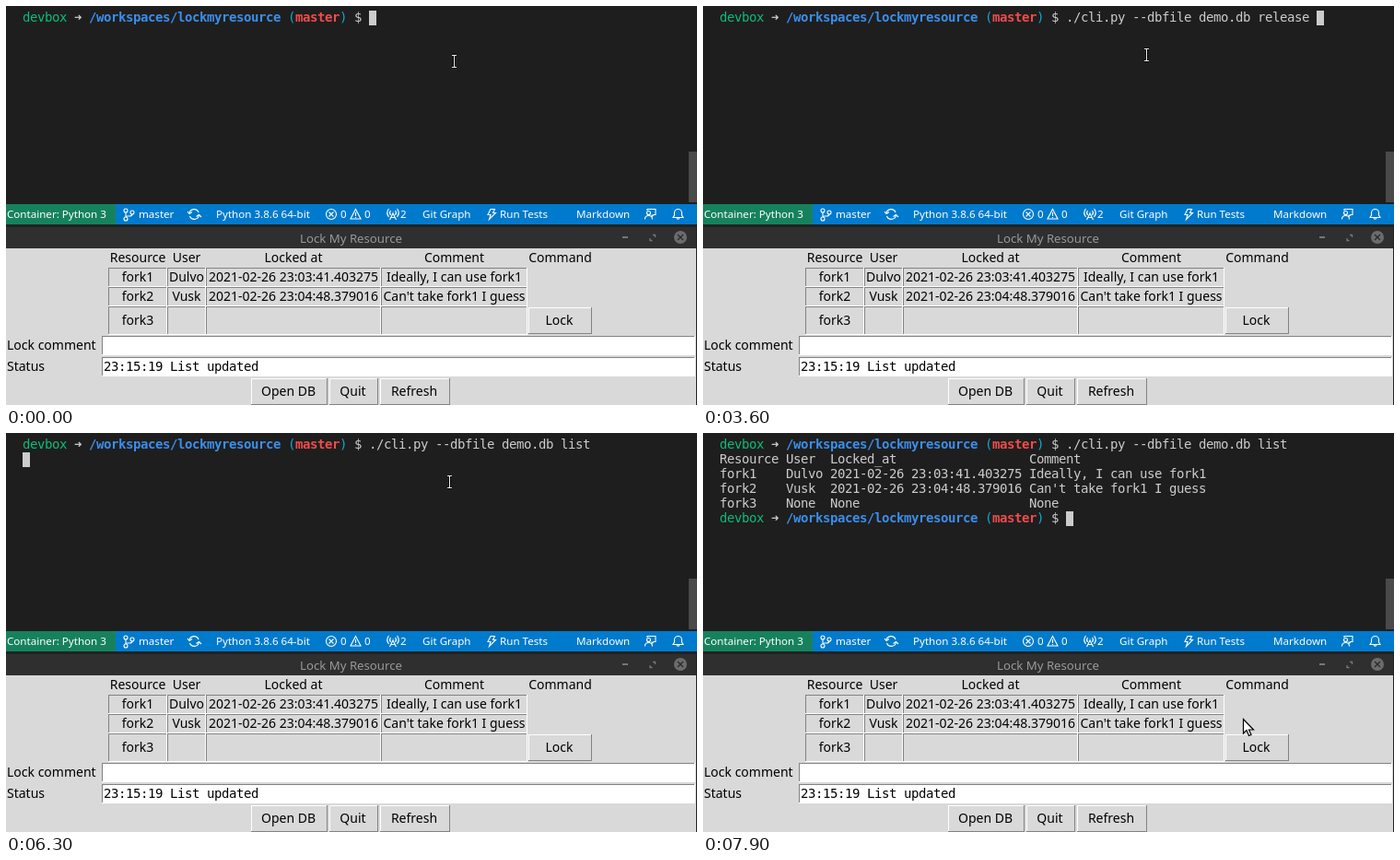
An HTML page with a canvas that plays this animation: 750 by 433 pixels, repeating every 8000 ms.

```html
<!DOCTYPE html>
<html lang="en">
<head>
<meta charset="utf-8">
<title>Lock My Resource</title>
<style>
html, body { margin: 0; width: 100%; height: 100%; overflow: hidden; background: #1e1e1e; }
canvas { display: block; }
</style>
</head>
<body>
<canvas id="stage" width="750" height="433"></canvas>
<script>
const ctx = document.getElementById('stage').getContext('2d', { alpha: false });
const LOOP = 8000, CELL = 8, ROW = 16;
const MONO = '14px "DejaVu Sans Mono", monospace';
const SANS = '14px "Noto Sans", sans-serif';
const SMALL = '11.6px "Noto Sans", sans-serif';
const COMMAND = './cli.py --dbfile demo.db ';
const USERS = ['Dulvo', 'Vusk'];
const TIMES = ['2021-02-26 23:03:41.403275', '2021-02-26 23:04:48.379016'];
const COMMENTS = ['Ideally, I can use fork1', "Can't take fork1 I guess"];

// Typed input from each moment on
const TYPING = [
  [0, ''], [2400, COMMAND + 'release fork3'], [3600, COMMAND + 'release '],
  [4100, COMMAND], [5800, COMMAND + 'l'], [6000, COMMAND + 'li'],
  [6100, COMMAND + 'lis'], [6200, COMMAND + 'list']
];
const ENTER = 6300, OUTPUT = 6500;

// Pointer stops: time, x, y
const POINTER = [
  [0, 486, 60], [200, 485, 58], [300, 483, 55], [400, 481, 53],
  [7600, 487, 72], [7700, 519, 160], [7800, 568, 268], [7900, 586, 310]
];

const latest = (list, t) => list.filter(item => item[0] <= t).pop();

function box(x, y, w, h, color) {
  ctx.fillStyle = color;
  ctx.fillRect(x, y, w, h);
}

function text(str, x, y, font = SANS, color = '#000', align = 'left') {
  ctx.font = font;
  ctx.fillStyle = color;
  ctx.textAlign = align;
  ctx.fillText(str, x, y);
}

const label = (str, x, y) => text(str, x, y, SANS, '#000', 'center');

function mono(str, x, y, color, bold) {
  [...str].forEach((ch, i) => text(ch, x + i * CELL, y, (bold ? 'bold ' : '') + MONO, color));
}

function bevel(x, y, w, h, topLeft, bottomRight, fill = '#d9d9d9') {
  box(x, y, w, h, bottomRight);
  box(x, y, w - 1, h - 1, topLeft);
  box(x + 1, y + 1, w - 2, h - 2, fill);
}

const sunken = (x, y, w, h, fill) => bevel(x, y, w, h, '#828282', '#fff', fill);

function button(str, x, y, w, h) {
  bevel(x, y, w, h, '#fff', '#828282');
  label(str, x + w / 2 - 1, y + 19);
}

function stroke(path, color = '#fff', width = 1.1) {
  ctx.strokeStyle = color;
  ctx.lineWidth = width;
  ctx.stroke(new Path2D(path));
}

// Terminal

const line = (str, row, col = 0, color = '#ccc', bold = false) =>
  mono(str, 18 + col * CELL, 17 + row * ROW, color, bold);

const caret = (row, col) => box(18 + col * CELL, 5 + row * ROW, CELL, ROW, '#ccc');

function prompt(row) {
  line('devbox', row, 0, '#0dbc79');
  line('➜', row, 7);
  line('/workspaces/lockmyresource', row, 9, '#3b8eea', true);
  line('(', row, 36, '#11a8cd');
  line('master', row, 37, '#f14c4c', true);
  line(')', row, 43, '#11a8cd');
  line('$', row, 45);
}

function listing() {
  const rows = [
    ['Resource', 'User', 'Locked_at', 'Comment'],
    ['fork1', USERS[0], TIMES[0], COMMENTS[0]],
    ['fork2', USERS[1], TIMES[1], COMMENTS[1]],
    ['fork3', 'None', 'None', 'None']
  ];
  rows.forEach((row, r) => row.forEach((cell, c) => line(cell, r + 1, [0, 9, 15, 42][c])));
}

function terminal(t) {
  box(0, 0, 750, 215, '#1e1e1e');
  box(741, 158, 9, 55, '#4a4a4a');
  const typed = latest(TYPING, t)[1];
  prompt(0);
  line(typed, 0, 47);
  if (t < ENTER) caret(0, 47 + typed.length);
  else if (t < OUTPUT) caret(1, 0);
  else {
    listing();
    prompt(5);
    caret(5, 47);
  }
}

function statusBar() {
  box(0, 215, 750, 22, '#007acc');
  box(0, 215, 119, 22, '#16825d');
  const items = [
    ['Container: Python 3', 1], ['master', 144], ['Python 3.8.6 64-bit', 228], ['0', 363],
    ['0', 389], ['2', 428], ['Git Graph', 452], ['Run Tests', 536], ['Markdown', 619]
  ];
  items.forEach(([str, x]) => text(str, x, 230, SMALL, '#fff'));
  // branch, sync
  stroke('M132 222a2 2 0 1 0-4 0a2 2 0 1 0 4 0M132 231a2 2 0 1 0-4 0a2 2 0 1 0 4 0' +
    'M139 224a2 2 0 1 0-4 0a2 2 0 1 0 4 0M130 224v5M137 226q0 2-3 2h-2q-2 0-2 1');
  stroke('M199 225a5.2 5.2 0 0 1 10-1M209.500 227a5.2 5.2 0 0 1-10 1M197 223l2 2.500 3-2M212 229l-2.500-2.500-3 2');
  // error, warning
  stroke('M358.500 226a5.500 5.500 0 1 0-11 0a5.500 5.500 0 1 0 11 0M350.500 223.500l5 5m0-5l-5 5');
  stroke('M379.500 220.500l5.500 10.500h-11zM379.500 224v4M379.500 229v1');
  // radio tower
  stroke('M420 225l-3.500 7M420 225l3.500 7M418 229.500h4M417.500 227q-2-2.500 0-5M422.500 227q2-2.500 0-5' +
    'M415.500 229q-3.500-4.500 0-9M424.500 229q3.500-4.500 0-9M419.500 224h1');
  // bolt, feedback, bell
  stroke('M526 220.500h4.500l-2 4h3l-7 7 1.500-5h-3z');
  stroke('M696 222v-1.500h9v6h-2l-2 2v-2M699.500 224.500a2 2 0 1 0-4 0a2 2 0 1 0 4 0M693.500 231.500q0-4 4-4t4 4');
  stroke('M724 229.500h11l-1.500-2.500v-2.500a4 4 0 0 0-8 0v2.500zM728 230q1.500 2.500 3 0');
}

// Window

function titleBar() {
  box(0, 237, 750, 26, '#222');
  box(0, 240, 749, 23, '#2f2f2f');
  text('Lock My Resource', 374.5, 257, '13.2px "Noto Sans", sans-serif', '#999', 'center');
  box(669, 250, 6, 2, '#777');
  stroke('M702 248.500h2.500v2.500M701.500 254.500h-2.500v-2.500', '#777', 1.3);
  ctx.fillStyle = '#6c6c6c';
  ctx.beginPath();
  ctx.arc(732, 251, 7, 0, 2 * Math.PI);
  ctx.fill();
  stroke('M729 248l6 6m0-6l-6 6', '#2a2a2a', 1.4);
}

function appWindow() {
  titleBar();
  box(0, 263, 750, 170, '#d9d9d9');
  const columns = [
    ['Resource', 111, 64, ['fork1', 'fork2', 'fork3']], ['User', 175, 42, USERS],
    ['Locked at', 217, 190, TIMES], ['Comment', 407, 159, COMMENTS]
  ];
  columns.forEach(([head, x, w, cells]) => {
    const mid = x + w / 2;
    label(head, mid, 278);
    [[284, 21], [305, 21], [326, 31]].forEach(([y, h], i) => {
      sunken(x, y, w, h);
      label(cells[i] || '', mid, y + h / 2 + 4.5 | 0);
    });
  });
  label('Command', 601.5, 278);
  button('Lock', 567, 327, 69, 29);
  text('Lock comment', 1, 373);
  text('Status', 1, 396);
  sunken(104, 358, 644, 21, '#fff');
  sunken(104, 381, 644, 21, '#fff');
  mono('23:15:19 List updated', 106, 396, '#000');
  button('Open DB', 266, 404, 83, 29);
  button('Quit', 351, 404, 53, 29);
  button('Refresh', 406, 404, 76, 29);
  box(749, 237, 1, 196, '#222');
}

function pointer(t) {
  const [, x, y] = latest(POINTER, t);
  if (y < 215) {
    const beam = `M${x - 2} ${y - 6.5}h5M${x - 2} ${y + 6.5}h5M${x + 0.5} ${y - 6.5}v13`;
    stroke(beam, '#000', 3);
    stroke(beam, '#eee', 1);
  } else {
    const arrow = new Path2D(`M${x + 0.5} ${y + 0.5}v15.500l3.500-3.500 2.500 6 2.500-1-2.500-5.500h5z`);
    ctx.fillStyle = '#fff';
    ctx.fill(arrow);
    stroke(arrow, '#000', 1.2);
  }
}

function draw() {
  const t = performance.now() % LOOP;
  terminal(t);
  statusBar();
  appWindow();
  pointer(t);
  requestAnimationFrame(draw);
}
draw();
</script>
</body>
</html>
```
